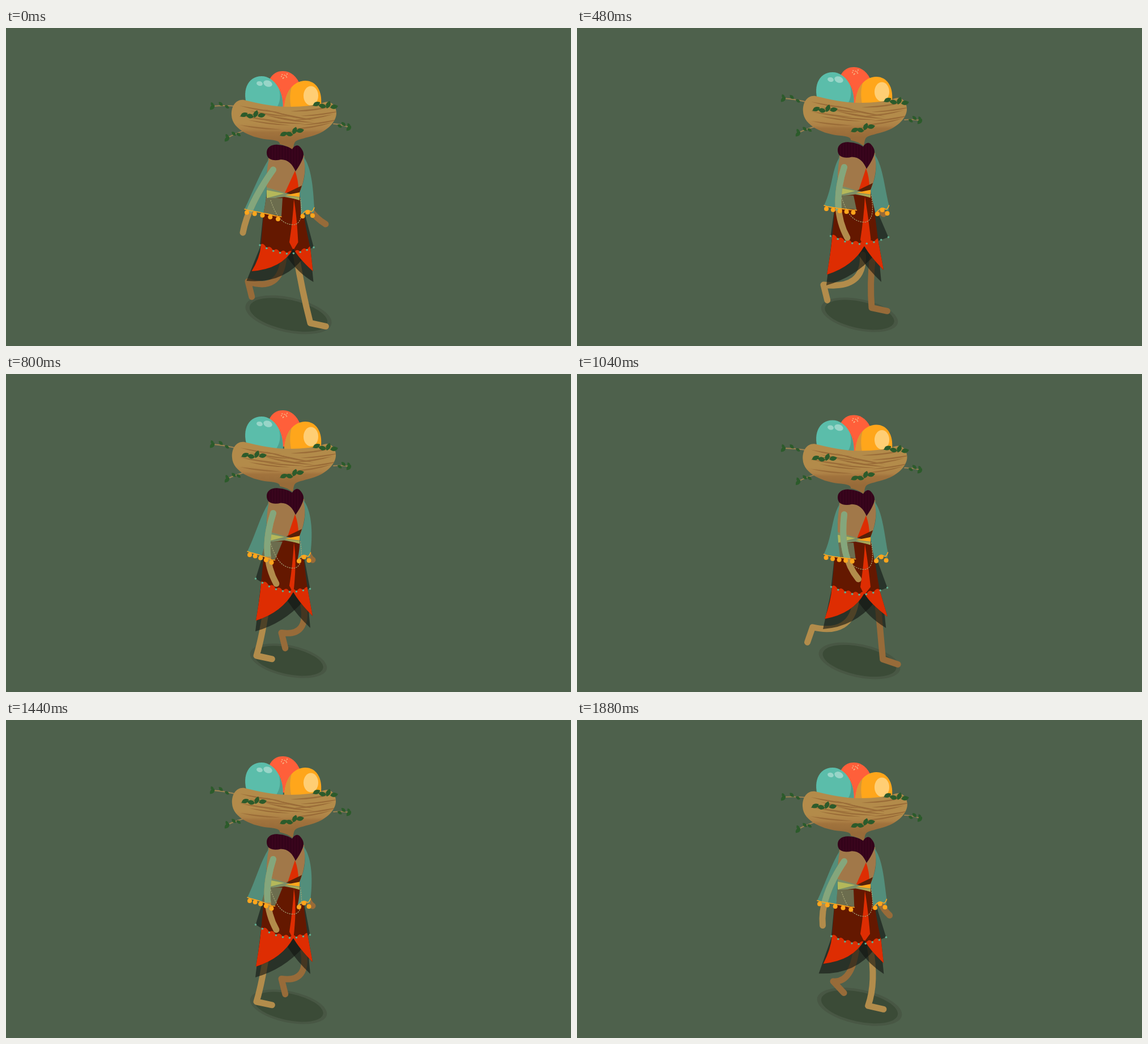
An HTML page with a canvas that plays this animation: 997x561 px, repeating every 1.92 s.

```html
<!DOCTYPE html>
<html lang="en">
<head>
<meta charset="utf-8">
<title>Nest walker</title>
<style>
html, body { margin: 0; width: 100%; height: 100%; overflow: hidden; background: #4e614c; }
canvas { display: block; }
</style>
</head>
<body>
<canvas id="stage" width="997" height="561"></canvas>
<script>
const ctx = document.getElementById('stage').getContext('2d');
const CYCLE = 640, STEP = 40, TAU = Math.PI * 2;
const TAN = '#b28c4b', BROWN = '#976b39', TEAL = '#538e7b', RED = '#de2d02', MAROON = '#641800';
const GOLD = '#ffa51c', LEAF = '#2c5b2b', SHADE = 'rgba(18,21,18,.62)', SKIN = '#a17849', STEM = '#a08351';

// angle: place in the stride; lift: 0 at full stride, 1 with legs passing; bob: body offset
let angle = 0, lift = 0, bob = 0;

// A swing around mid: once per stride (c, s) and twice per stride (c2, s2)
function swing(mid, c, s = 0, c2 = 0, s2 = 0) {
  return mid + c * Math.cos(angle) + s * Math.sin(angle)
    + c2 * Math.cos(2 * angle) + s2 * Math.sin(2 * angle);
}

function fill(d, color) {
  ctx.fillStyle = color;
  ctx.fill(new Path2D(d));
}
function line(d, color, width) {
  ctx.strokeStyle = color;
  ctx.lineWidth = width;
  ctx.stroke(new Path2D(d));
}
function oval(x, y, rx, ry, rot, color) {
  ctx.fillStyle = color;
  ctx.beginPath();
  ctx.ellipse(x, y, rx, ry, rot, 0, TAU);
  ctx.fill();
}
function disc([x, y], r, color) {
  oval(x, y, r, r, 0, color);
}
function shifted(dy, draw) {
  ctx.save();
  ctx.translate(0, dy);
  draw();
  ctx.restore();
}
function smooth(pts) {
  let d = `M${pts[0]}`;
  for (let i = 1; i < pts.length - 1; i++) {
    const p = pts[i], n = pts[i + 1], last = i === pts.length - 2;
    d += `Q${p} ${last ? n : [(p[0] + n[0]) / 2, (p[1] + n[1]) / 2]}`;
  }
  return d;
}
const off = (p, x, y) => [p[0] + x, p[1] + y];
const onBody = (x, y) => [x, y + bob];

// count points from a to b; bend(u) adds to a straight fall
function chain(a, b, count, bend) {
  return Array.from({ length: count }, (_, i) => {
    const u = i / (count - 1);
    return [a[0] + (b[0] - a[0]) * u, a[1] + (b[1] - a[1]) * u + bend(u)];
  });
}

function leaf(x, y, rot, size) {
  ctx.save();
  ctx.translate(x, y);
  ctx.rotate(rot);
  ctx.scale(size, size);
  fill('M-1 .15Q-.3 -1.1 1 -.15Q.3 1.1 -1 .15Z', LEAF);
  ctx.restore();
}

function ground() {
  const s = 1 - .11 * lift;
  oval(498.5, 506, 77.5 * s, 31 * s, .21, '#485744');
  oval(498.5, 506, 70 * s, 26.5 * s, .21, '#3b4b37');
}

function leg(hip, knee, ankle, side, color) {
  const tilt = swing(44, -32 * side, -32 * side, 0, 20) * Math.PI / 180;
  const toe = off(ankle, 28 * Math.cos(tilt), 28 * Math.sin(tilt));
  line(`M${hip}Q${off(hip, ...knee)} ${ankle}L${toe}`, color, 11);
}

function legs() {
  leg([swing(517, -21, 1.5, -6), 405], [swing(3, -9, 8), swing(53, 9, 6)],
    [swing(498, -66, -17, -5, -17), swing(476, -30, -18.5, 1, -7)], -1, BROWN);
  leg([swing(489, 17, -21.5, 6), 400], [swing(-3, 13, -6), 62],
    [swing(451.5, 72.5, 3.5, 13, 18), swing(481, 33.5, 22, 6, 5)], 1, TAN);
}

function skirt() {
  const first = [swing(446, 0, -3.5, 2), swing(373.5, 0, -3, 9.5)];
  const last = [swing(543, 0, -6.5), swing(380.5, 0, 5, 6.5)];
  const dots = chain(first, last, 9, u => 13 * Math.sin(Math.PI * u));
  const left = [450, 383 - 12 * lift], right = [537 - 5 * lift, 388 - 9.5 * lift];
  const tipL = [433.5 + 7.5 * lift, 429 + 6 * lift], tipR = [swing(544, -5.5, 0, 3), 429 - 2 * lift];
  const darkL = [swing(433, -1.5, 0, -7), 446 + 8 * lift], darkR = [swing(542, -4.5, 0, 5), 448];
  const split = onBody(507, 389), waistL = onBody(455, 318), waistR = onBody(523, 312);

  fill(`M${left}L${darkL}Q${[490, 452 - 12 * lift]} ${onBody(525, 405)}L${split}Z`, SHADE);
  fill(`M${split}L${onBody(497, 405)}Q${onBody(515, 432)} ${darkR}L${off(darkR, -2, -20)}L${right}Z`, SHADE);
  fill(`M${waistL}L${dots.slice(0, 4).join('L')}L${split}L${dots.slice(6).join('L')}L${waistR}Z`, '#28332a');

  ctx.save();
  ctx.clip(new Path2D(`M${onBody(460, 297)}L${onBody(518, 297)}L${waistR}Q${onBody(527, 345)} ${right}`
    + `L${tipR}Q${onBody(517, 407)} ${split}Q${onBody(487, 425)} ${tipL}`
    + `Q${off(left, -2, 23)} ${left}Q${onBody(453, 345)} ${waistL}Z`));
  fill('M400 270H570V470H400Z', MAROON);
  let hem = `M${dots[0]}`;
  for (let i = 1; i < dots.length; i++) {
    const [x, y] = dots[i - 1], [ex, ey] = dots[i];
    hem += `Q${[(x + ex) / 2, (y + ey) / 2 - 9]} ${dots[i]}`;
  }
  fill(hem + 'L570 470L400 470Z', RED);
  const foot = onBody(swing(514.5, 0, -5, 1), 378);
  fill(`M${onBody(508, 302)}Q${onBody(506, 340)} ${onBody(500, 378)}L${onBody(507, 392)}L${foot}Q${onBody(513, 330)} ${onBody(508, 302)}Z`, RED);
  ctx.restore();
  dots.forEach(p => disc(p, 1.8, '#5fae91'));
}

function torso() {
  fill('M463 230C459 250 460 270 460 284L491 293L518 296L522 280Q531 250 526 225L490 215Z', SKIN);
  fill(`M510 252L${492 + 5 * lift} 291L516 286Q516 268 510 252Z`, RED);
  fill('M493 292L522 278L518 291L496 297Z', '#572009');
  fill('M460 281L493 291L518 297V303L491 298L460 302Z', '#7c8d65');
  fill('M460 286L491 292L460 300Z', '#b4b85a');
  fill('M491 296L518 299V304Z', '#a9a955');
  fill('M493 295L518 290V298Z', GOLD);
}

function shawl() {
  const a = [swing(432.5, -5, -5, -2.5), swing(323, -1.5, 0, 4)];
  const b = [swing(479, 0, -9.5, 1), swing(333, 0, 3.5, 4)];
  const drop = b[1] - a[1];
  const left = chain(a, b, 5, u => drop * (u * u - u) + 2 * Math.sin(Math.PI * u));
  const r = [swing(523.5, 0, -6.5), swing(330.5, 0, 1, 1.5)];
  const right = chain(r, off(r, 17.5, -1), 3, u => -6.5 * Math.sin(Math.PI * u));
  const start = off(a, -4, -6), end = off(b, 6, -4), inner = off(left[2], 2, -4);
  const head = off(r, -3, 0), tail = off(right[2], 3, -14);

  fill(`M${onBody(459, 300)}L${onBody(488, 300)}L${end}L${off(b, 0, -6)}L${off(left[3], 0, -4)}L${inner}Z`, '#6c6d4e');
  fill(`M${onBody(464, 231)}C${onBody(449, 254)} ${off(start, 16, -34)} ${start}`
    + `L${left.slice(0, 3).map(p => off(p, 0, -4)).join('L')}L${inner}`
    + `Q${onBody(460, 298)} ${onBody(460, 280)}Q${onBody(459, 252)} ${onBody(464, 231)}Z`, TEAL);
  fill(`M${onBody(524, 226)}C${onBody(539, 244)} ${onBody(542, 282)} ${tail}`
    + `L${off(right[2], 2, -4)}L${off(right[1], 0, -3)}L${head}`
    + `Q${onBody(520, 306)} ${onBody(518, 290)}L${onBody(522, 280)}Q${onBody(532, 252)} ${onBody(524, 226)}Z`, TEAL);

  shifted(bob, () => {
    ctx.setLineDash([1.5, 2.5]);
    line('M467 304C476 330 486 347 508 347C524 345 523 320 519 298', '#a5a576', 1.2);
    ctx.setLineDash([]);
  });
  nearArm();

  line(smooth([start, ...left.map(p => off(p, 1, -4)), end]), GOLD, 1.6);
  line(smooth([head, ...right.map(p => off(p, 0, -5)), tail]), GOLD, 1.6);
  left.concat(right).forEach(p => disc(p, 4, GOLD));
}

// The arm shows green through the sleeve
function nearArm() {
  const hand = [swing(474, -53, 0, -3, -15), swing(364, 3, 0, -6)];
  const arm = `M${onBody(471.5, 250)}Q${[swing(448, -21), swing(318, -5)]} ${hand}`;
  line(arm, TAN, 11);
  ctx.save();
  ctx.beginPath();
  ctx.rect(380, 200, 200, swing(124.5, -2, 0, 2.5));
  ctx.clip();
  line(arm, '#84a67c', 11);
  ctx.restore();
}

function farArm() {
  const hand = [swing(541, 23, 0, 0, 15), swing(328, 18)];
  line(`M${onBody(526, 290)}Q${onBody(530, 325)} ${hand}`, BROWN, 11);
}

function collar() {
  const shape = 'M460 220C460 210 469 205 480 206C492 207 500 210 505 214C508 208 514 205 518 209'
    + 'C526 217 527 224 522 234C518 243 514 248 511 253C506 241 498 232 485 232C473 235 460 233 460 220Z';
  fill(shape, '#34031a');
  ctx.save();
  ctx.clip(new Path2D(shape));
  for (let x = 465; x < 525; x += 5) line(`M${x} 204V252`, 'rgba(90,20,50,.35)', 1);
  ctx.restore();
}

function eggs() {
  const hop = Math.max(0, Math.sin(angle)) ** 2, base = -7 * lift;
  shifted(base - 5 * hop, () => {
    fill('M464 93C470 80 478 76 489 76C503 76 513 86 519 100L508 140H480Z', '#ff5f3a');
    for (let i = 0; i < 8; i++) disc([491 + 5 * Math.cos(i * 2.4), 85 + (i - 3.5) * 1.1], 1, '#f4bd8c');
  });
  shifted(base - 3 * hop, () => {
    fill('M428 144C414 112 426 85 451 85C474 85 492 114 488 146Z', '#5bbdaa');
    fill('M488 146C490 128 486 116 482 108C486 124 482 136 474 146Z', '#4ea08f');
    oval(447.5, 98, 5.5, 4, .25, '#98d5c8');
    oval(462, 98, 8, 5.5, .35, '#98d5c8');
  });
  shifted(base - 2 * hop, () => {
    fill('M491 145C491 112 508 93 528 93C548 93 558 112 556 134L552 145Z', '#ffa61b');
    fill('M491 145C491 126 497 111 504 104C500 118 501 132 504 145Z', '#d99634');
    oval(538, 119.5, 13, 17, 0, '#ffce74');
  });
}

function strand(x, y, dx, dy, sag) {
  const mx = x + dx / 2, my = y + dy / 2 + sag;
  fill(`M${x} ${y}Q${mx} ${my - 2.5} ${x + dx} ${y + dy}Q${mx} ${my + 2.5} ${x} ${y}Z`, '#9a6c38');
}

function sprig(x, y, dx, dy) {
  line(`M${x - 7} ${y + 2}Q${x + dx / 2} ${y + dy / 2 - 2} ${x + dx + 4} ${y + dy}`, '#7b6a35', 1.2);
  for (let i = 0; i < 4; i++) {
    const u = i / 3;
    leaf(x + dx * u, y + dy * u + (i % 2 ? 2 : -1), Math.sin(i * 2.2) * .8 - .3, 7);
  }
}

function nest() {
  const bowl = 'M398 154C397 138 406 125 420 127C446 133 470 139 500 139C525 139 548 136 562 131'
    + 'C574 127 583 138 583 150C583 166 566 182 545 189C530 194 516 196 511 200C507 204 508 209 506 215'
    + 'Q495 207 483 205C484 200 476 198 466 197C436 195 399 180 398 154Z';
  const tone = ctx.createLinearGradient(0, 168, 0, 200);
  tone.addColorStop(0, '#b38b4a');
  tone.addColorStop(.35, '#ad8146');
  tone.addColorStop(.5, '#a1733d');
  tone.addColorStop(1, BROWN);

  ctx.save();
  ctx.translate(490 * .01 * lift, 0);
  ctx.scale(1 - .01 * lift, 1);
  fill(bowl, tone);
  ctx.clip(new Path2D(bowl));
  // Straw falls to the right on the left half and climbs on the right half
  for (let i = 0; i < 5; i++) {
    strand(412 + i % 2 * 16, 137 + i * 8.5, 74, 12 - i, 3);
    strand(455 + i % 2 * 18, 143 + i * 5, 72, 18 - i * 3, 2);
    strand(502 + i % 2 * 18, 147 + i * 8, 76, -9 - i, 4);
  }
  ctx.restore();

  sprig(420 + 2 * lift, 154 - 3 * lift, 31, -2);
  sprig(548, 135, 31, 2);
  sprig(490, 188, 29, -9);
}

// Tips move further than the roots, which ride on the nest
function twig(x, y, dx, dy, whip) {
  const tipX = x + dx, tipY = y + dy - whip * lift, rootY = y - 7 * lift;
  const midY = (rootY + tipY) / 2 - 2;
  line(`M${x} ${rootY}Q${x + dx / 2} ${midY} ${tipX} ${tipY}`, STEM, 1.8);
  leaf(tipX, tipY + 2, -.7, 6);
  leaf(tipX, tipY - 3, 1.2, 4.5);
  leaf(x + dx * .65, midY * .5 + tipY * .5 - 3, .9, 5);
  leaf(x + dx * .4, midY + 3, .7, 4.5);
}

function draw(now) {
  const t = Math.floor(now / STEP) * STEP % CYCLE;
  angle = TAU * t / CYCLE;
  lift = (1 - Math.cos(2 * angle)) / 2;
  bob = -4.5 * lift;

  ctx.fillStyle = '#4e614c';
  ctx.fillRect(0, 0, 997, 561);
  ctx.lineCap = ctx.lineJoin = 'round';
  ground();
  farArm();
  legs();
  skirt();
  shifted(bob, torso);
  shawl();
  twig(407, 138, -43, 0, 14);
  twig(424, 180, -34, 14, 9);
  twig(578, 169, 27, 6, 12);
  eggs();
  shifted(-7 * lift, nest);
  shifted(bob, collar);
}

const begin = performance.now();
function tick() {
  draw(performance.now() - begin);
  requestAnimationFrame(tick);
}
tick();
</script>
</body>
</html>
```
